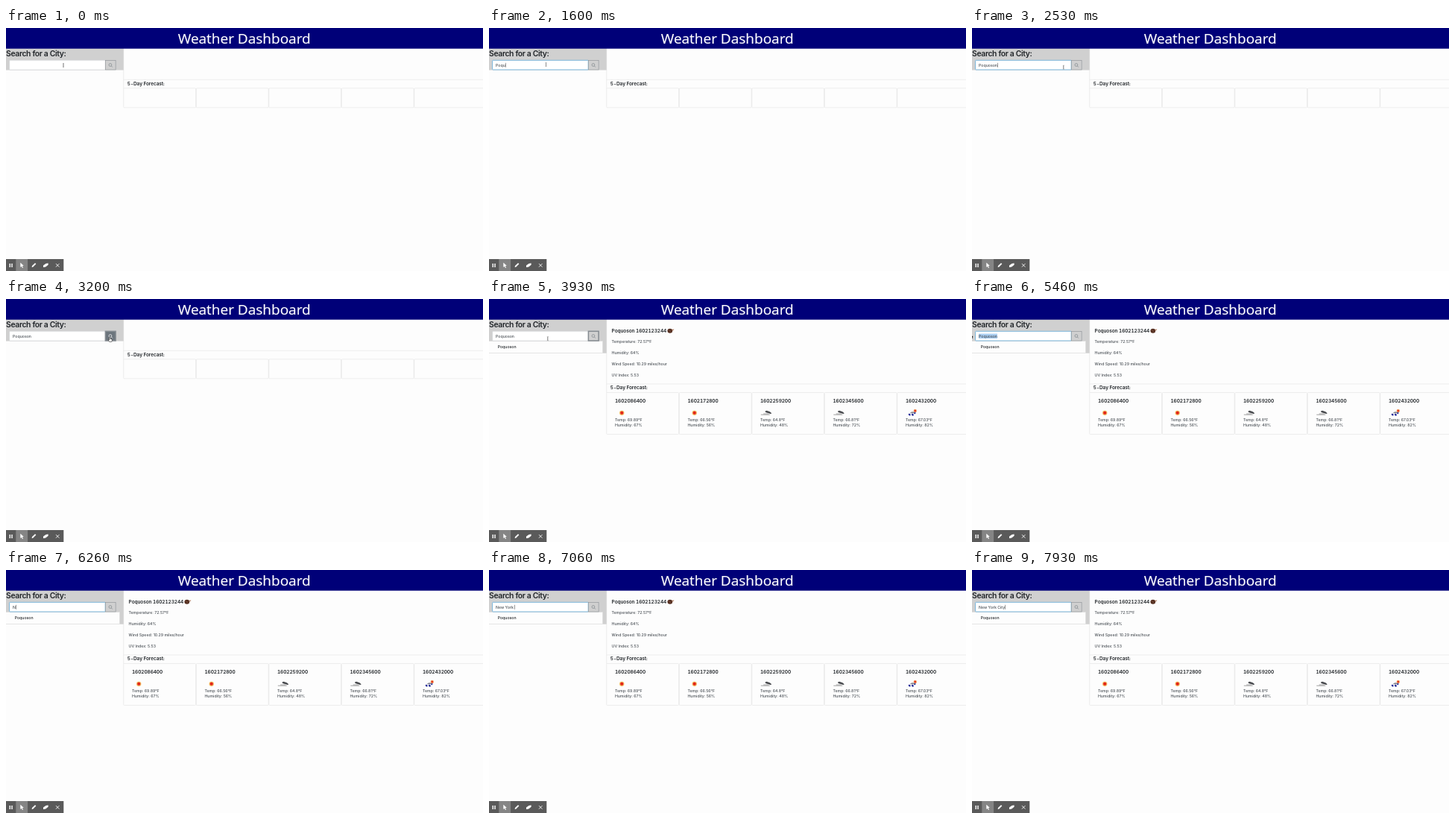
Write an HTML page that moves like this. It is 640 by 326 pixels and loops after 8 s.

```html
<!DOCTYPE html>
<html lang="en">
<head>
<meta charset="utf-8">
<title>Weather Dashboard</title>
<style>
  html, body { margin: 0; width: 100%; height: 100%; overflow: hidden; background: #fdfdfd; }
  svg { display: block; width: 100vw; height: 100vh; }
  text { font: 500 5.2px Inter, sans-serif; fill: #4b5157; white-space: pre; }
  .title { font: 500 19px "Open Sans", "Noto Sans", sans-serif; fill: #fff; stroke: #fff; stroke-width: .2; text-anchor: middle; }
  .search { font-size: 10.4px; font-weight: 600; fill: #212529; letter-spacing: -.36px; }
  .head { font-size: 6.5px; font-weight: 600; fill: #212529; letter-spacing: -.1px; font-variant-numeric: tabular-nums; }
  .dark { fill: #212529; }
  .line { fill: none; stroke: #e2e2e2; stroke-width: .6; }
</style>
</head>
<body>
<svg id="stage" viewBox="0 0 640 326" preserveAspectRatio="none"></svg>
<script>
const LOOP = 8000;
const CARD_W = 97.5, MAIN_X = 157.7, TEXT_X = 9;

const label = (x, y, s, cls = '') => `<text x="${x}" y="${y}" class="${cls}">${s}</text>`;
const box = (x, y, w, h, attrs) => `<rect x="${x}" y="${y}" width="${w}" height="${h}" ${attrs}/>`;
const at = (x, y, body) => `<g transform="translate(${x} ${y})">${body}</g>`;

// Weather icons, centred on the origin
const sun = `<circle r="3.4" fill="#f8dc9a"/><circle r="2.7" fill="#f0a050"/><circle r="2" fill="#e2231a"/>`;
const cloud = `<path d="M-2.6-2.2Q-1-3.6 1-2.6Q4-2.2 6 .4Q5.6 1.4 3.4 1L-1.4-.6Q-3-1.2-2.6-2.2Z" fill="#4a4c50"/>
  <path d="M-8.4 2.4H3.6M-5 1.2H2" stroke="#8a8a8a" stroke-width=".8"/>`;
const rain = `<circle cx="3.6" cy="-2.8" r="1.9" fill="#e2381f" stroke="#f6c27c" stroke-width=".7"/>
  <path d="M-3.4 .4Q-2-2 .4-1.6Q3-1.6 4.4 .4Z" fill="#85858f"/>
  <path d="M-5 1.4l2 1.8M-.8 1.4l2 2M2.6-.2l1.2 1" stroke="#1c2493" stroke-width="2.2"/>`;
const dusk = `<ellipse cx="-.7" rx="3.4" ry="3" fill="#553022"/>
  <path d="M-2.8-1.2L1 1" stroke="#80533f" stroke-width=".7"/>
  <path d="M2-1l2.6-.9" stroke="#a86a48" stroke-width="1"/>`;

const forecast = [
  ['1602086400', '69.89', 67, sun],
  ['1602172800', '66.56', 56, sun],
  ['1602259200', '64.8', 48, cloud],
  ['1602345600', '66.81', 72, cloud],
  ['1602432000', '67.03', 82, rain],
];

const cardFrame = (i, y, h) =>
  box(MAIN_X + i * CARD_W, y, CARD_W - .5, h, 'rx="1" class="line"');

const panel = (lineY, cardH) => `
  <path class="line" d="M${MAIN_X} 28V${lineY + 12}M${MAIN_X} ${lineY}H640"/>
  ${label(162.8, lineY + 7.2, '5-Day Forecast:', 'head')}
  ${forecast.map((_, i) => cardFrame(i, lineY + 11.5, cardH)).join('')}`;

const card = ([date, temp, humidity, icon], i) => at(169 + i * CARD_W, 0,
  label(0, 138.7, date, 'head') + at(9.2, 152.8, icon) +
  label(0, 163.8, `Temp: ${temp}°F`) + label(0, 171.1, `Humidity: ${humidity}%`));

const results = `
  ${box(0, 56, 158, 16.7, 'fill="#d0d0d0"')}
  ${box(-.5, 56.5, 153, 16, 'fill="#fdfdfd" stroke="#dcdcdc" stroke-width=".5"')}
  ${label(11.7, 66.2, 'Poquoson', 'dark')}
  ${panel(114, 56)}
  ${label(164.6, 45.2, 'Poquoson 1602123244', 'head')}
  ${at(243.5, 42.8, dusk)}
  ${['Temperature: 72.57°F', 'Humidity: 64%', 'Wind Speed: 10.29 miles/hour', 'UV Index: 5.53']
    .map((s, i) => label(164.6, 58.7 + i * 15, s)).join('')}
  ${forecast.map(card).join('')}`;

const toolbar = `
  ${box(0, 310, 77.3, 16, 'fill="#5a5a5a"')}${box(13.3, 310, 15.8, 16, 'fill="#858585"')}
  <path d="M5.2 316v5M8 316v5" stroke="#fff" stroke-width="1.4"/>
  <path d="M19.3 314.8v6.2l1.5-1.3 1.2 2.4 1-.5-1.2-2.3 2-.2z" fill="#fff"/>
  <path d="M34.6 320.9l.4-1.8 4-3.9 1.4 1.4-4 3.9z" fill="#fff"/>
  <path d="M50 321v-2.4l3.6-2.6 3-.6v2.4l-3.4 2.6z" fill="#fff"/>
  <path d="M67 316.2l4.4 4.4M71.4 316.2l-4.4 4.4" stroke="#fff" stroke-width=".9"/>`;

stage.innerHTML = `
  ${box(0, 0, 640, 326, 'fill="#fdfdfd"')}
  ${box(0, 27, 158, 29.5, 'fill="#d0d0d0"')}
  ${box(0, 0, 640, 27.7, 'fill="#000078"')}
  ${label(319.7, 20.8, 'Weather Dashboard', 'title')}
  ${label(0, 38.3, 'Search for a City:', 'search')}
  <g id="empty">${panel(69.3, 26)}</g>
  <g id="results">${results}</g>
  ${box(4.6, 43.3, 128.6, 12.7, 'id="field" fill="#fff" rx=".8"')}
  ${box(133.4, 43.3, 13.7, 12.7, 'id="button"')}
  <g id="lens" fill="none" stroke-width=".7"><circle cx="139.9" cy="49.5" r="1.9"/><path d="M141.3 50.9l1.7 1.7"/></g>
  ${box(TEXT_X, 46.6, 0, 6.4, 'id="mark" fill="#a9cdf0"')}
  ${label(TEXT_X, 51.7, '', 'typed')}
  ${box(0, 46.8, .5, 6, 'id="caret" fill="#333"')}
  ${toolbar}
  <g id="pointer">
    <path id="beam" d="M-.9-2.6Q0-2.6 0-2V2Q0 2.6-.9 2.6M.9-2.6Q0-2.6 0-2V2Q0 2.6 .9 2.6" fill="none" stroke="#777" stroke-width=".6"/>
    <path id="hand" d="M-.8-2.6Q0-3.4.6-2.6V-.6L2.6 0Q3.2.4 2.8 1.8L2.2 3.4H-.8L-2.4.8Q-2 0-.8.8Z" fill="#fff" stroke="#222" stroke-width=".6"/>
    <path id="arrow" d="M0-2.6V2.6L1.2 1.6 2 3.2 2.7 2.8 2 1.3H3.4Z" transform="translate(-1.4 0)" fill="#000" stroke="#fff" stroke-width=".3"/>
  </g>`;

const $ = id => document.getElementById(id);
const typed = document.querySelector('.typed');
const show = (id, on) => $(id).style.display = on ? '' : 'none';
const paint = (id, attrs) => Object.entries(attrs).forEach(([k, v]) => $(id).setAttribute(k, v));

// Pointer path: time, x, y
const path = [
  [0, 77, 50], [700, 76.5, 49], [2200, 76.5, 49], [2700, 139.5, 54],
  [3480, 139.5, 54], [3850, 81, 53.5], [4250, 60, 50], [4450, 60, 50], [5000, 0, 50], [LOOP, 0, 50],
];

// Moments at which each character lands
const first = { word: 'Poquoson', keys: [1000, 1180, 1370, 1540, 1700, 1830, 1960, 2080] };
const second = { word: 'New York City',
  keys: [6230, 6330, 6430, 6520, 6620, 6720, 6810, 6900, 6990, 7250, 7420, 7570, 7720] };

const typedBy = ({ word, keys }, t) => word.slice(0, keys.filter(k => k <= t).length);
const between = (t, a, b) => t >= a && t < b;

function pointerAt(t) {
  const i = path.findIndex(p => p[0] > t);
  const [t0, x0, y0] = path[i - 1], [t1, x1, y1] = path[i];
  const k = (t - t0) / (t1 - t0), e = k * k * (3 - 2 * k);
  return [x0 + (x1 - x0) * e, y0 + (y1 - y0) * e];
}

function draw(t) {
  const [x, y] = pointerAt(t);
  const retyping = t >= second.keys[0];
  const focused = between(t, 600, 3050) || t >= 4450;
  const hover = x > 133;
  const pressed = between(t, 3050, 4450);
  const found = t >= 3360;

  show('empty', !found);
  show('results', found);
  typed.textContent = typedBy(retyping ? second : first, t);
  const width = typed.getComputedTextLength();

  const left = Math.max(TEXT_X, x);
  const selected = between(t, 4450, second.keys[0]) ? Math.max(0, TEXT_X + width - left) : 0;
  paint('mark', { x: left, width: selected });
  paint('caret', { x: TEXT_X + width + .2 });
  show('caret', focused && !selected);

  paint('field', { stroke: focused ? '#6fb0da' : '#c8ccd0', 'stroke-width': focused ? .9 : .5 });
  paint('button', {
    fill: hover ? '#6c757d' : '#d0d0d0',
    stroke: pressed ? '#858b91' : '#8b9095',
    'stroke-width': pressed ? 1.5 : .6,
  });
  paint('lens', { stroke: hover ? '#fff' : '#7d848a' });

  show('pointer', !retyping);
  paint('pointer', { transform: `translate(${x} ${y})` });
  show('hand', hover);
  show('arrow', x < 4);
  show('beam', !hover && x >= 4);
}

const start = performance.now();
(function tick() {
  draw((performance.now() - start) % LOOP);
  requestAnimationFrame(tick);
})();
</script>
</body>
</html>
```
